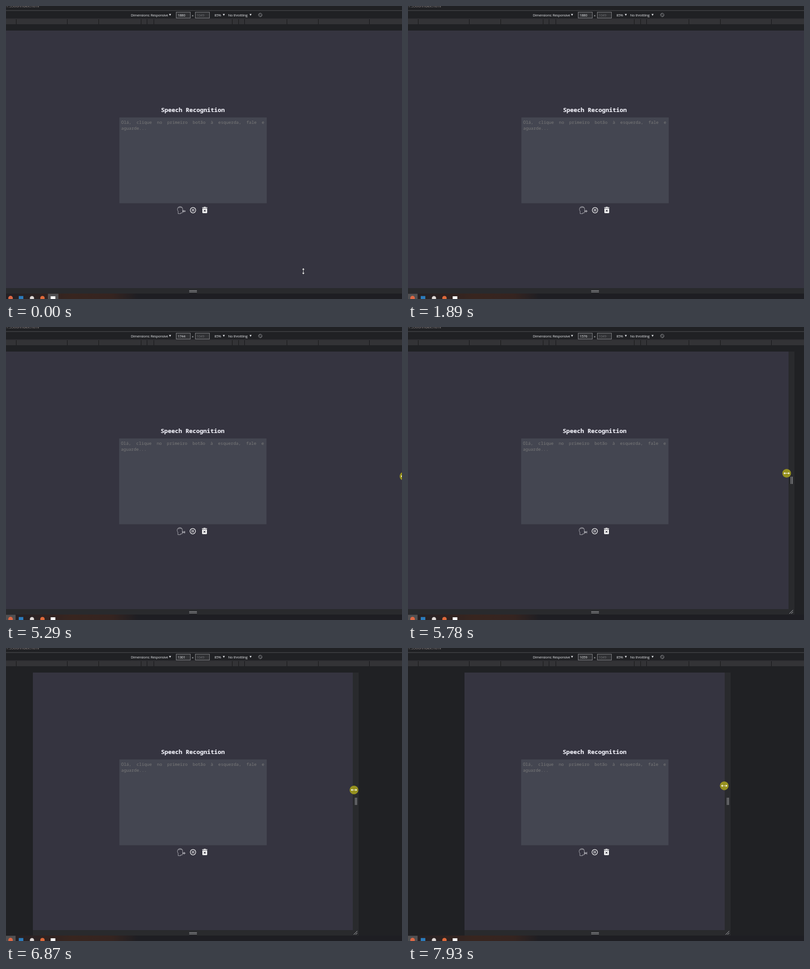
These frames come from a looping animation (869 px wide and 644 px high, 7.99 s). An HTML page:

```html
<!DOCTYPE html>
<html lang="pt">
<head>
<meta charset="utf-8">
<title>Speech Recognition</title>
<style>
html, body { margin: 0; width: 869px; height: 644px; overflow: hidden; background: #202124; }
svg { display: block; }
text { white-space: pre; }
.ui { font: 7.6px "Open Sans", "Noto Sans", sans-serif; letter-spacing: -.2px; fill: #e8eaed; }
.mono { font: 9.36px "Noto Sans Mono", "DejaVu Sans Mono", monospace; fill: #7a7a7a; }
.title { font-size: 12.96px; font-weight: 700; fill: #efeff7; stroke: #efeff7; stroke-width: .2; }
.line { fill: none; stroke: #d4d4da; }
.grip { fill: none; stroke: #b9babd; }
.field { fill: #303134; stroke: #85868a; }
.pointer { fill: #fff; stroke: #222; stroke-width: .6; paint-order: stroke; }
</style>
</head>
<body>
<svg width="869" height="644" viewBox="0 0 869 644">
  <defs>
    <linearGradient id="glow">
      <stop offset="0" stop-color="#232126"/>
      <stop offset=".5" stop-color="#38251f"/>
      <stop offset=".8" stop-color="#352420"/>
      <stop offset="1" stop-color="#1e1e23"/>
    </linearGradient>
    <path id="resize" d="M-6.8 0l3.2-2.6v2.2h7.2v-2.2L6.8 0 3.6 2.6V.4h-7.2v2.2z"/>
  </defs>

  <!-- browser toolbar and ruler -->
  <text class="ui" y="3" style="fill:#938b8c;font-size:9px">1:5500/index.html</text>
  <path fill="#3a3b3e" d="M0 9h869v2H0zM0 27.5h869v1H0z"/>
  <path fill="#333336" d="M0 29h869v11H0z"/>
  <path id="ticks" stroke="#151517"/>
  <text class="ui" x="274" y="23">Dimensions: Responsive</text>
  <text class="ui" x="457.5" y="23">85%</text>
  <text class="ui" x="487.5" y="23">No throttling</text>
  <path fill="#e8eaed" d="M357.7 17.5h4.6l-2.3 4zM475.7 17.5h4.6l-2.3 4zM534.4 17.5h4.6l-2.3 4z"/>
  <rect class="field" x="373.5" y="13.5" width="31" height="13"/>
  <rect class="field" x="415.5" y="13.5" width="31" height="13"/>
  <text class="ui" id="size" x="376.8" y="23"></text>
  <text class="ui" x="418.5" y="23" style="fill:#6f7074">1049</text>
  <text class="ui" x="407.5" y="23.5">×</text>
  <g fill="none" stroke="#8e8f93" stroke-width=".8" transform="translate(558 19.7) rotate(-45)">
    <circle r="4"/><path d="M-1.6-2.8h3.2v5.6h-3.2z"/>
  </g>

  <!-- resizable viewport -->
  <rect id="frame" y="54" height="578" fill="#292a2d"/>
  <rect id="view" y="54" height="566" fill="#353440"/>
  <path class="grip" d="M402 625.5h17M402 628.5h17"/>
  <g id="handles" class="grip">
    <path d="M5.5 329v16M8.5 329v16"/>
    <path d="M2 630l8-8M6 630l4-4"/>
  </g>

  <g id="page">
    <text class="mono title" x="340.2" y="232.8">Speech Recognition</text>
    <rect x="248.8" y="245" width="323.4" height="188.5" fill="#444651"/>
    <text class="mono" x="252.8" y="259.2">Olá,  clique  no  primeiro  botão  à  esquerda,  fale  e</text>
    <text class="mono" x="252.8" y="271.8">aguarde...</text>
    <g class="line" stroke-width=".75">
      <path d="M377.8 456.5v-5.3q-2-2.2-1.6-5.2c.5-3.3 2.9-5.2 5.8-5.2 3.4 0 5.6 2.3 5.6 5.3v7.6q0 1-1 1h-3v1.8h-5.8M378 443.8q4-2.3 8.5-.6"/>
      <path id="wave"/>
    </g>
    <g fill="none" stroke="#fff" stroke-width="1.3">
      <circle cx="410.4" cy="448.8" r="6"/>
      <path d="M408.9 446v5.6M411.9 446v5.6"/>
    </g>
    <path fill="#fff" d="M430.6 442.4h3l.8-.8h3.6l.8.8h3v1.5h-11.2zM431 445h10.4v9q0 1.3-1.3 1.3h-7.8q-1.3 0-1.3-1.3z"/>
    <path stroke="#353440" stroke-width="1.3" d="M433.9 447.8l4.6 4.6M438.5 447.8l-4.6 4.6"/>
  </g>

  <!-- taskbar -->
  <path fill="#1e1e23" d="M0 632h869v12H0z"/>
  <path fill="url(#glow)" d="M0 632h290v12H0z"/>
  <rect id="active" y="632.5" height="12" fill="#515052"/>
  <circle cx="10" cy="642" r="5" fill="#dd6845"/>
  <path fill="#2b7cbd" d="M28 637.5h10v7H28z"/>
  <circle cx="57" cy="642" r="4.6" fill="#ded8d6"/>
  <circle cx="80" cy="642" r="4.8" fill="#df6a3b"/>
  <path fill="#fff" d="M98 638h10.3v6H98z"/>

  <use id="updown" class="pointer" href="#resize" transform="translate(652.5 583) rotate(90)"/>
  <path id="arrow" class="pointer" d="M0 0v11l2.6-2.4 1.7 3.9 1.8-.8-1.7-3.8h3.5z"/>
  <g id="drag">
    <circle r="9.6" fill="#96911f"/>
    <use href="#resize" fill="#fff"/>
  </g>
</svg>
<script>
const LOOP = 7990, CENTER = 409.9, SCALE = .2695;
const $ = id => document.getElementById(id);
const set = (id, attrs) => { for (const k in attrs) $(id).setAttribute(k, attrs[k]); };
const show = (id, on) => { $(id).style.display = on ? '' : 'none'; };
const move = (id, x, y) => set(id, { transform: `translate(${x} ${y})` });

// Linear interpolation through [time, a, b, ...] keys, held at both ends
function at(keys, t) {
  const i = keys.findIndex(k => k[0] > t);
  if (i === 0) return keys[0].slice(1);
  if (i < 0) return keys[keys.length - 1].slice(1);
  const [a, b] = [keys[i - 1], keys[i]];
  const f = (t - a[0]) / (b[0] - a[0]);
  return a.slice(1).map((v, j) => v + (b[j + 1] - v) * f);
}

// time, viewport width, pointer x, pointer y
const resizing = [
  [4120, 1880, 912, 334], [4900, 1802, 891, 331], [5290, 1744, 873.5, 328],
  [5780, 1576, 831, 321.5], [5980, 1539, 821, 320], [6170, 1421, 789.7, 315],
  [6870, 1301, 763.7, 312], [7650, 1175, 727, 307], [7930, 1059, 694, 302.8]
];
const toTaskbar = [[70, 650, 577], [850, 387, 575], [1420, 8, 646]];
const toEdge = [[1620, 400, 445], [1890, 824, 397]];

set('ticks', {
  d: [22, 134, 203, 296, 309, 324, 496, 510, 523, 616, 685, 797].map(x => `M${x + .5} 29v11`).join('')
});

function draw(t) {
  const [exact, x, y] = at(resizing, t);
  const width = Math.round(exact);
  const left = Math.round(CENTER - width * SCALE);
  const right = Math.round(CENTER + width * SCALE);
  $('size').textContent = width;
  set('frame', { x: left, width: right - left + 13 });
  set('view', { x: left, width: right - left });
  move('handles', right, 0);
  // Centred content snaps to the nearest device pixel
  move('page', t >= 4120 && (width % 4 === 0 || width % 4 === 3) ? -.6 : 0, 0);

  const beat = t < 1890 ? t : Math.max(1890, t - 2230);
  set('wave', {
    d: [0, 1, 2, 3].map(i => {
      const h = 1.9 + 1.1 * Math.sin(beat / 110 + i * 2.1);
      return `M${388.6 + i * 1.5} ${451 - h}v${2 * h}`;
    }).join('') + 'M387 451h6.5'
  });

  set('active', t < 1400 ? { x: 92, width: 23 } : { x: 0, width: 21 });
  show('updown', t < 70);
  show('arrow', t >= 70 && t < 1420 || t >= 1620 && t < 1890);
  move('arrow', ...at(t < 1500 ? toTaskbar : toEdge, t));
  show('drag', t >= 4120);
  move('drag', x, y);
}

function tick(now) {
  draw(now % LOOP);
  requestAnimationFrame(tick);
}
draw(0);
requestAnimationFrame(tick);
</script>
</body>
</html>
```
